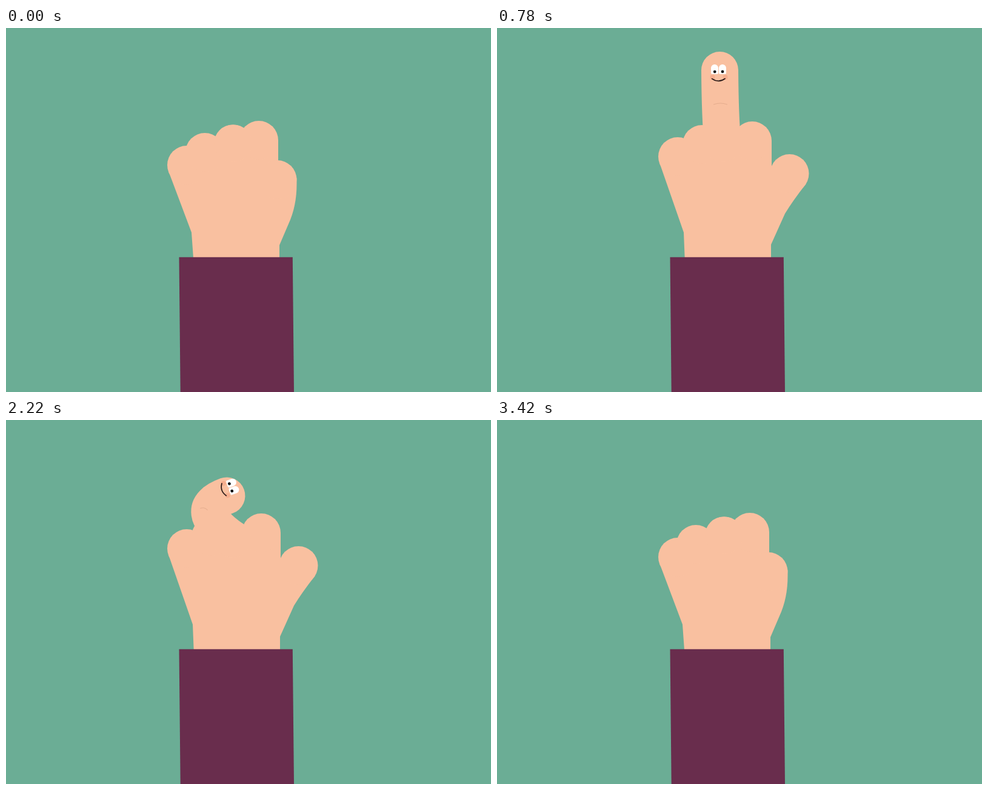
Write an HTML page with a canvas that moves like this. It is 800 px wide and 600 px high and loops after 3.6 s.

```html
<!DOCTYPE html>
<html lang="en">
<head>
<meta charset="utf-8">
<title>Hand</title>
<style>
html, body { margin: 0; height: 100%; overflow: hidden; background: #6bad95; }
canvas { display: block; width: 100vw; height: 100vh; }
</style>
</head>
<body>
<canvas id="stage" width="800" height="600"></canvas>
<script>
const ctx = document.getElementById('stage').getContext('2d');
const SKIN = '#f9c0a0', PERIOD = 1800, STEP = 30, { PI, sin, cos } = Math;

const clamp = v => Math.max(0, Math.min(1, v));
const part = (t, from, to) => clamp((t - from) / (to - from));
const mix = (a, b, u) => a + (b - a) * u;
const mixPoint = (a, b, u) => [mix(a[0], b[0], u), mix(a[1], b[1], u)];

// tilt: wrist in degrees; open: fist 0 to hand 1; rise: finger curled 0 to straight 1
function motion(t) {
  const fall = 1 - part(t, 1470, 1620);
  const grow = part(t, 60, 550) ** 2 + .13 * sin(PI * part(t, 550, 780));
  return {
    tilt: 6 * sin(PI * part(t, 0, 345)),
    open: sin(PI / 2 * part(t, 120, 420)) * fall,
    rise: grow * fall ** 2.6
  };
}

function disc(x, y, r, color) {
  ctx.fillStyle = color;
  ctx.beginPath();
  ctx.arc(x, y, r, 0, 7);
  ctx.fill();
}

function curve(x0, y0, cx, cy, x1, y1, width, color) {
  ctx.lineWidth = width;
  ctx.strokeStyle = color;
  ctx.beginPath();
  ctx.moveTo(x0, y0);
  ctx.quadraticCurveTo(cx, cy, x1, y1);
  ctx.stroke();
}

function drawPalm(open) {
  const pinky = mixPoint([298, 226], [298, 212], open);
  const ring = mixPoint([328, 205], [338, 192], open);
  const index = mixPoint([417, 185], [421, 186], open);
  const thumb = mixPoint([447.5, 250], [482.5, 240], open);
  const heel = mixPoint([469, 316], [475, 306], open);
  const edge = mix(-.1, .55, open), side = index[0] + 32;

  ctx.fillStyle = SKIN;
  ctx.beginPath();
  ctx.moveTo(pinky[0] - 30, pinky[1] + 10);
  ctx.lineTo(306 + 2 * open, 337);
  ctx.lineTo(310.5, 400);
  ctx.lineTo(451 + open, 400);
  ctx.lineTo(451 + open, 358 - open);
  ctx.lineTo(...heel);
  ctx.quadraticCurveTo(481 + 6 * open, 286, thumb[0] + 32 * cos(edge), thumb[1] + 32 * sin(edge));
  for (const p of [thumb, [side, 242], [side, index[1]], index, ring, pinky]) ctx.lineTo(...p);
  ctx.fill();
  for (const p of [pinky, ring, index, thumb]) disc(...p, 32, SKIN);
}

function drawFace() {
  disc(-10, 13, 4, 'rgba(240,140,110,.35)');
  disc(11, 13, 4, 'rgba(240,140,110,.35)');
  ctx.fillStyle = '#fff';
  for (const x of [-12.5, .5]) {
    ctx.beginPath();
    ctx.roundRect(x, -8, 12, 16, [6, 6, 2, 2]);
    ctx.fill();
  }
  disc(-6.3, 4, 2.4, '#111');
  disc(6.5, 4, 2.4, '#111');
  curve(-11, 15.5, 0, 23, 10.5, 15.5, 1.7, '#2a1a18');
}

function drawFinger(rise) {
  const bow = Math.sqrt(Math.max(0, sin(PI * rise)));
  const bx = 375 - 3 * rise, by = 190 + 6 * bow;
  const cx = 372.5 - 4.5 * rise - 67 * bow, cy = 190 - 43 * clamp(3.5 * rise);
  const tx = 375 - 7.5 * rise - 7 * bow, ty = 190 - 120.5 * rise;
  const turn = Math.atan2(tx - cx, cy - ty);

  disc(bx, by, 30.5, SKIN);
  curve(bx, by, cx, cy, tx, ty, 61, SKIN);

  ctx.globalAlpha = part(rise, .3, .5);
  ctx.save();
  ctx.translate(.16 * bx + .48 * cx + .36 * tx - 10 * bow, .16 * by + .48 * cy + .36 * ty);
  ctx.rotate(turn * .2);
  const half = 11 - 5 * bow;
  curve(-half, 0, 0, -4, half, 0, 1, '#e5ad8e');
  ctx.restore();

  ctx.save();
  ctx.translate(tx, ty);
  ctx.rotate(turn);
  ctx.translate(-2 - 9 * bow, -1.5 - 13.5 * bow);
  drawFace();
  ctx.restore();
  ctx.globalAlpha = 1;
}

function drawSleeve() {
  ctx.fillStyle = '#692d4d';
  ctx.beginPath();
  ctx.moveTo(285.5, 377.8);
  ctx.lineTo(472.8, 377.8);
  ctx.lineTo(475, 600);
  ctx.lineTo(287.7, 600);
  ctx.fill();
}

function frame() {
  const t = Math.floor(performance.now() % PERIOD / STEP) * STEP;
  const { tilt, open, rise } = motion(t);
  ctx.fillStyle = '#6bad95';
  ctx.fillRect(0, 0, 800, 600);
  ctx.lineCap = ctx.lineJoin = 'round';
  ctx.save();
  ctx.translate(375, 448);
  ctx.rotate(tilt * PI / 180);
  ctx.translate(-375, -448);
  drawPalm(open);
  drawFinger(rise);
  ctx.restore();
  drawSleeve();
  requestAnimationFrame(frame);
}
frame();
</script>
</body>
</html>
```
